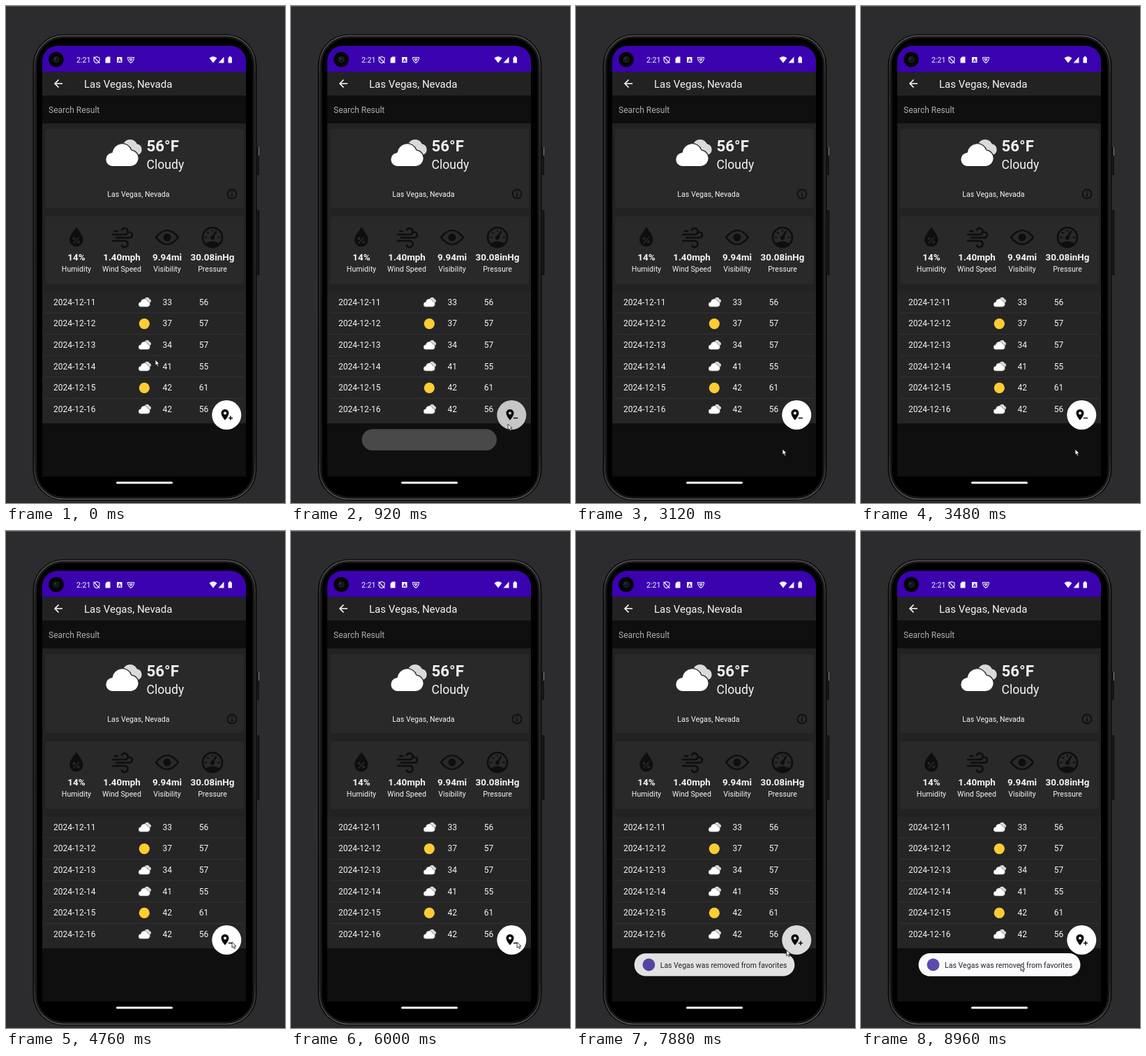
An HTML page that plays this animation: 400 by 711 pixels, repeating every 9 s.

```html
<!DOCTYPE html>
<html lang="en">
<head>
<meta charset="utf-8">
<title>Weather favorites</title>
<style>
html, body { margin: 0; width: 100%; height: 100%; overflow: hidden; background: #2c2c2e; }
svg { display: block; width: 400px; height: 711px; font-family: Roboto, "Noto Sans", sans-serif; fill: #f4f4f4; }
.line { fill: none; stroke-linecap: round; stroke-linejoin: round; }
.mid { text-anchor: middle; }
</style>
</head>
<body>
<svg viewBox="0 0 400 711">
  <defs>
    <linearGradient id="rim" x2="0" y2="1">
      <stop stop-color="#555"/><stop offset=".09" stop-color="#303030"/>
      <stop offset=".9" stop-color="#2a2a2a"/><stop offset="1" stop-color="#555"/>
    </linearGradient>
    <g id="cloud">
      <path fill="#dadada" d="M24 14A11 11 0 0 1 45 8.500A8 8 0 0 1 46 24H30Z"/>
      <path fill="#fff" stroke="#282936" stroke-width="1.200" d="M10.500 40.500A10 10 0 0 1 9 20.500A14.500 14.500 0 0 1 37 17.200A11.700 11.700 0 0 1 36 40.500Z"/>
    </g>
    <path id="pin" d="M0-8C-3.300-8-5.500-5.600-5.500-2.500C-5.500 1.500 0 7.500 0 7.500S5.500 1.500 5.500-2.500C5.500-5.600 3.300-8 0-8ZM0-4.500A2 2 0 1 1 0-.5A2 2 0 1 1 0-4.500Z" fill-rule="evenodd"/>
    <path id="shield" d="M0-4.500L4-3V0C4 2.300 2.400 4 0 4.800C-2.400 4-4 2.300-4 0V-3Z"/>
  </defs>

  <!-- Phone body -->
  <path d="M0 0H400V1H0Z" fill="#555"/>
  <path d="M360 202H363V242H360ZM360 292H363.500V385H360Z" fill="#141414"/>
  <path d="M362.500 202V214" stroke="#888"/>
  <rect x="38.500" y="40.500" width="321" height="667" rx="44" fill="#080808"/>
  <rect x="42.500" y="44" width="313" height="660" rx="40" fill="#000" stroke="#161616" stroke-width="4"/>
  <rect x="41" y="42.500" width="316" height="663" rx="41.500" fill="none" stroke="url(#rim)" stroke-width="1.500"/>

  <!-- Screen -->
  <path d="M52 673V79A22 22 0 0 1 74 57H322A22 22 0 0 1 344 79V673Z" fill="#0f0f0f"/>
  <path d="M52 94.500V79A22 22 0 0 1 74 57H322A22 22 0 0 1 344 79V94.500Z" fill="#3b02b0"/>
  <path d="M52 94.500H344V128H52Z" fill="#222"/>
  <path d="M52 168H344V409H52Z" fill="#222"/>
  <rect x="56" y="176" width="285" height="113" rx="4" fill="#292929"/>
  <rect x="56" y="301" width="285" height="97" rx="4" fill="#292929"/>
  <path d="M52 409H344V597H52Z" fill="#252525"/>
  <rect x="158" y="680.500" width="81" height="3" rx="1.500" fill="#fff"/>

  <!-- Status bar -->
  <circle cx="72" cy="76.500" r="10.800" fill="#050505"/>
  <circle cx="72" cy="76.500" r="4" fill="#101216" stroke="#252a30"/>
  <circle cx="71" cy="75.500" r="1" fill="#4d5961"/>
  <text x="101" y="80.500" font-size="10.6">2:21</text>
  <g class="line" stroke="#f4f4f4" stroke-width="1.100">
    <use href="#shield" x="130" y="77"/><path d="M126 73L134 81.500"/>
    <path d="M174.500 73.500H183.500Q183.500 78.500 179 81.500Q174.500 78.500 174.500 73.500ZM177 75.500H181L179 78.500Z"/>
  </g>
  <path d="M145 72.500H149.500V81.500H142.500V75Z"/>
  <path d="M159 73H166.500V81H159Z"/>
  <text x="162.800" y="79.500" font-size="7" font-weight="700" class="mid" style="fill:#3b02b0">A</text>
  <path d="M291.500 74.500Q297 70 302.500 74.500L297 81.500ZM304.500 81.500L312.500 72.500V81.500ZM318.500 73.500H320V72H322.500V73.500H324V81.500H318.500Z"/>

  <!-- App bar -->
  <path d="M81 111H70M75.500 105.500L70 111L75.500 116.500" fill="none" stroke="#fff" stroke-width="1.600"/>
  <text x="112" y="117" font-size="15">Las Vegas, Nevada</text>
  <text x="61" y="153" font-size="12" style="fill:#adadad">Search Result</text>

  <!-- Current weather -->
  <use href="#cloud" x="143" y="189"/>
  <text x="201.500" y="208" font-size="22.300" font-weight="700">56°F</text>
  <text x="201.500" y="232.500" font-size="17.600">Cloudy</text>
  <text x="190" y="273" font-size="10.600" class="mid">Las Vegas, Nevada</text>
  <g class="line" stroke="#0b0b0b" stroke-width="1.500"><circle cx="324" cy="269" r="6.500"/><path d="M324 268.500V272.500M324 265.700V266"/></g>

  <!-- Metric icons -->
  <path d="M101 316.500C105 322 110.500 328 110.500 334.500A9.700 9.700 0 0 1 91 334.500C91 328 97 322 101 316.500Z" fill="#0e0e0e"/>
  <g class="line" stroke="#292929" stroke-width="1.600"><path d="M104.500 331L97 339"/><circle cx="97.500" cy="332.500" r="1.300"/><circle cx="104" cy="337.500" r="1.300"/></g>
  <g class="line" stroke="#0e0e0e" stroke-width="2.700">
    <path d="M153 327H170A4.500 4.500 0 1 0 166 320.500M158 331.500H177A4 4 0 1 0 173.500 325.500M153 336H170A4.500 4.500 0 1 1 166 342.500M156 322H160"/>
    <path d="M215 331Q231 311 247 331Q231 351 215 331Z"/>
    <circle cx="296" cy="331" r="14"/>
    <path d="M296 331L301 323"/>
    <path d="M286 331H287.500M289 324L290 325M296 321V322M304.500 331H306" stroke-width="2"/>
  </g>
  <g fill="#0e0e0e">
    <circle cx="231" cy="331" r="5.500"/>
    <circle cx="296" cy="331.500" r="3"/>
    <path d="M285 340Q296 333 307 340Q296 350 285 340Z"/>
  </g>
  <g id="metrics" class="mid"></g>
  <g id="days" font-size="12"></g>

  <!-- Favorite button -->
  <circle id="fab" cx="316.300" cy="585" r="21"/>
  <use href="#pin" x="314" y="585" fill="#080808"/>
  <path class="line" d="M319.500 589.500H324.500" stroke="#080808" stroke-width="1.500"/>
  <path id="plus" class="line" d="M322 587V592" stroke="#080808" stroke-width="1.500"/>

  <g id="toast">
    <rect id="pill" y="604" height="33" rx="16.500" fill="#fbfbfd"/>
    <g id="content">
      <circle id="badge" cy="620.500" r="9" fill="#5a4caf"/>
      <text id="message" y="624.800" font-size="10.600" style="fill:#25252a"></text>
    </g>
  </g>
  <path id="cursor" d="M0 0V8.300L1.900 6.600L3.300 9.700L4.800 9L3.400 6H6Z" fill="#f5f5f5" stroke="#171717" stroke-width=".8"/>
</svg>
<script>
const $ = id => document.getElementById(id);
const set = (id, attrs) => { for (const k in attrs) $(id).setAttribute(k, attrs[k]); };

$('metrics').innerHTML = [
  [101, '14%', 'Humidity'], [166, '1.40mph', 'Wind Speed'],
  [231, '9.94mi', 'Visibility'], [296, '30.08inHg', 'Pressure']
].map(([x, value, label]) =>
  `<text x="${x}" y="364" font-size="13.4" font-weight="700">${value}</text>
   <text x="${x}" y="379.500" font-size="10.6">${label}</text>`).join('');

$('days').innerHTML = [[33, 56], [37, 57], [34, 57], [41, 55], [42, 61], [42, 56]].map(([low, high], i) => {
  const y = 423.5 + i * 30.6;
  const icon = i % 3 === 1
    ? `<circle cx="198.3" cy="${y + .5}" r="7.6" fill="#fc3"/>`
    : `<use href="#cloud" transform="translate(190 ${y - 7.3}) scale(.35)"/>`;
  const rule = i < 5 ? `<path d="M56 ${y + 15.5}H341" stroke="#333"/>` : '';
  return `${rule}<text x="68" y="${y + 4.2}">2024-12-${11 + i}</text>${icon}
    <text x="224.500" y="${y + 4.2}">${low}</text><text x="276.800" y="${y + 4.2}">${high}</text>`;
}).join('');

const LOOP = 9000;
const FRAME = 40;
// Cursor stops: time, x, y
const path = [
  [0, 214, 506], [600, 308, 592], [760, 311, 598], [1080, 311, 598],
  [1500, 215, 656], [1880, 192, 632], [2780, 192, 632], [3200, 307, 634], [3480, 307, 634],
  [3680, 321, 597], [3880, 324, 588], [7720, 324, 588], [8200, 238, 632], [8480, 229, 630], [8800, 229, 621], [LOOP, 229, 621]
];
const toasts = [
  { start: 840, end: 3000, x: 94.5, w: 207.5, text: 'Las Vegas was added to favorites' },
  { start: 7680, end: 9900, x: 82.5, w: 232, text: 'Las Vegas was removed from favorites' }
];

const clamp = v => Math.max(0, Math.min(1, v));
const smooth = v => v * v * (3 - 2 * v);

function cursorAt(t) {
  const i = path.findIndex(p => p[0] > t);
  const [a, b] = [path[i - 1], path[i]];
  const k = smooth((t - a[0]) / (b[0] - a[0]));
  return [a[1] + (b[1] - a[1]) * k, a[2] + (b[2] - a[2]) * k];
}

function drawToast(t) {
  const item = toasts.find(o => t >= o.start && t < o.end);
  if (!item) return set('toast', { opacity: 0 });
  const { start, end, x, w, text } = item;
  const shown = smooth(Math.min(clamp((t - start) / 250), clamp((end - t) / 250)));
  const scale = .91 + .09 * shown;
  const cx = x + w / 2;
  set('toast', {
    opacity: shown,
    transform: `translate(${cx} 620.500) scale(${scale}) translate(${-cx} -620.500)`
  });
  set('content', { opacity: clamp(shown * 2 - .5) });
  set('pill', { x, width: w });
  set('badge', { cx: x + 21 });
  set('message', { x: x + 37.5 });
  if ($('message').textContent !== text) $('message').textContent = text;
}

function draw(now) {
  const t = Math.floor(now % LOOP / FRAME) * FRAME;
  // Each tap darkens the button just before its toast appears.
  const press = Math.max(...toasts.map(({ start }) =>
    Math.min(clamp((t - start + 80) / 100), clamp((start + 340 - t) / 220))));
  const tone = Math.round(255 - 57 * press);
  set('fab', { fill: `rgb(${tone},${tone},${tone})` });
  set('plus', { visibility: t >= toasts[0].start && t < toasts[1].start ? 'hidden' : 'visible' });
  set('cursor', { transform: `translate(${cursorAt(t)})` });
  drawToast(t);
}

const began = performance.now();
function tick() {
  draw(performance.now() - began);
  requestAnimationFrame(tick);
}
tick();
</script>
</body>
</html>
```
